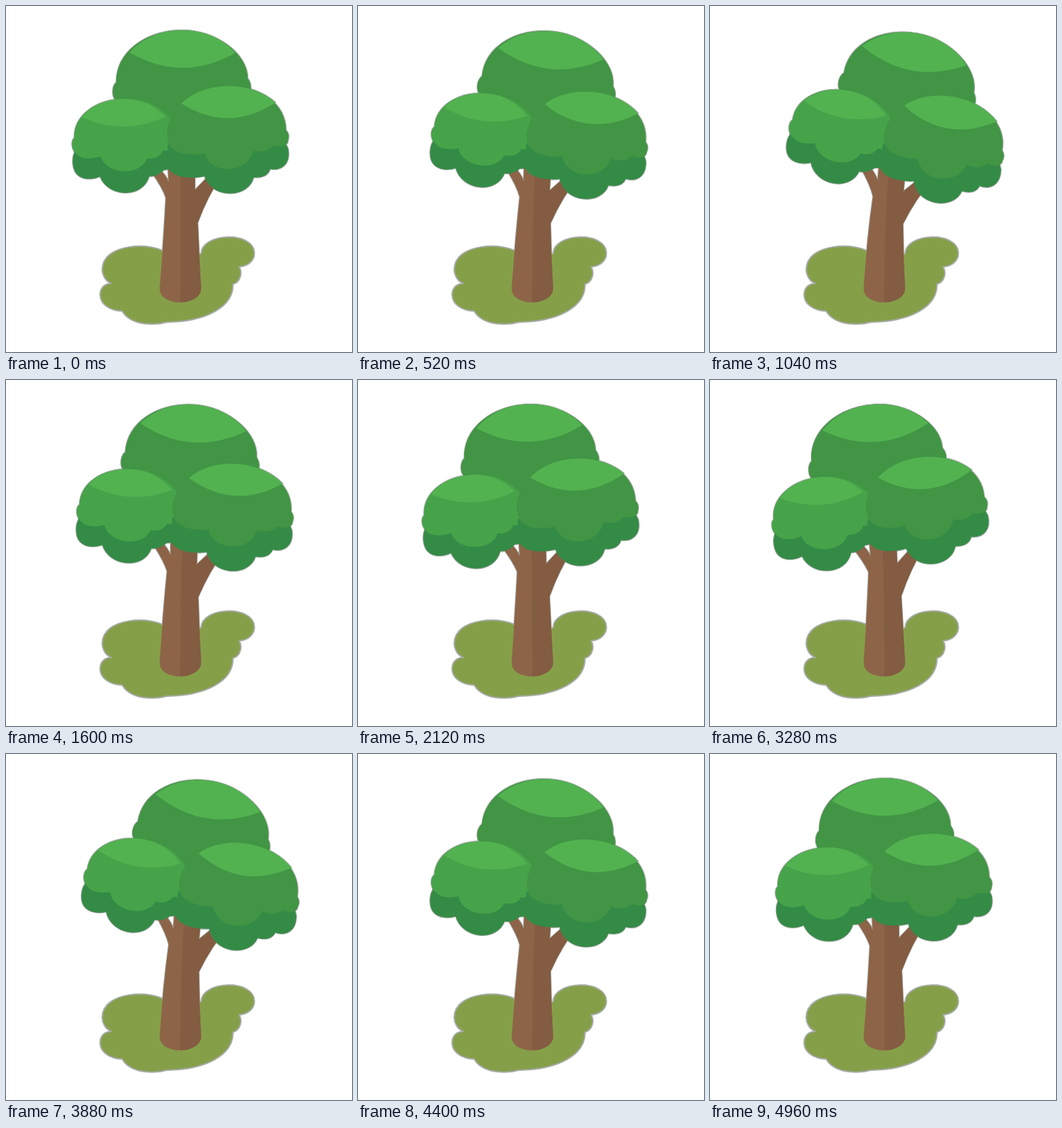
An HTML page without scripts that plays this animation: 500x500 px, repeating every 5000 ms.

```html
<!DOCTYPE html>
<html lang="en">
<head>
<meta charset="utf-8">
<title>Swaying tree</title>
<style>
  html, body { margin: 0; width: 100%; height: 100%; overflow: hidden; background: #fff; }
  svg { display: block; width: 100%; height: 100%; }
  .rim { stroke: #a6aba6; stroke-width: 2; stroke-linejoin: round; }
  .ground { fill: #859f49; }
  .bark { fill: #8d6447; }
  .bark-shade { fill: #835c42; }
  .light { fill: #52b250; }
  .mid { fill: #46a349; }
  .deep { fill: #419544; }
  .shade { fill: #348b46; }
</style>
</head>
<body>
<svg viewBox="0 0 500 500">
  <defs>
    <!-- The foot stays put and the top bends: upright, right, left -->
    <path id="trunk">
      <animate attributeName="d" dur="5s" repeatCount="indefinite" keyTimes="0;.192;.592;.792;.992;1" values="
        M222 408Q228 335 231 277Q226 262 210 240L222 236Q231 244 235 254L234 232L273 232L273 266L296 242L311 246Q292 273 277 313Q279 360 282 408C282 434 222 436 222 408Z;
        M222 408Q227 335 236 275Q233 260 220 236L232 233Q240 242 243 252L245 230L284 234L280 268L306 248L321 253Q298 278 279 315Q279 361 282 408C282 434 222 436 222 408Z;
        M222 408Q227 336 226 279Q218 265 200 246L212 239Q222 246 227 256L223 234L262 230L266 264L286 237L302 239Q286 270 275 311Q279 359 282 408C282 434 222 436 222 408Z;
        M222 408Q227 335 236 275Q233 260 220 236L232 233Q240 242 243 252L245 230L284 234L280 268L306 248L321 253Q298 278 279 315Q279 361 282 408C282 434 222 436 222 408Z;
        M222 408Q228 335 231 277Q226 262 210 240L222 236Q231 244 235 254L234 232L273 232L273 266L296 242L311 246Q292 273 277 313Q279 360 282 408C282 434 222 436 222 408Z;
        M222 408Q228 335 231 277Q226 262 210 240L222 236Q231 244 235 254L234 232L273 232L273 266L296 242L311 246Q292 273 277 313Q279 360 282 408C282 434 222 436 222 408Z"/>
    </path>
    <clipPath id="inTrunk"><use href="#trunk"/></clipPath>

    <g id="crown">
      <animateTransform attributeName="transform" type="rotate" dur="5s" repeatCount="indefinite" keyTimes="0;.192;.592;.792;.992;1"
        values="-.2 251 291;11.1 251 291;-11.5 251 291;11.1 251 291;-.7 251 291;-.2 251 291"/>
      <path class="deep" d="M158 135C153 128 154 115 160 110C160 65 204 35 255 35C303 35 350 68 350 105C354 110 356 118 353 125L340 200H190Z"/>
      <path class="light" d="M179 67C198 46 226 35 255 35C286 35 314 47 332 68Q256 111 179 67Z"/>

      <path class="shade" d="M99 212C95 220 96 236 103 243C112 252 127 250 136 246C148 277 198 278 207 246C218 247 226 240 228 237L245 235V200H99Z"/>
      <path class="mid" d="M99 190C95 193 93 206 103 214C112 223 128 220 137 217C145 244 195 246 204 220C215 222 225 216 227 209Q240 210 248 200V165L238 162C222 143 198 134 172 134C130 134 98 158 99 190Z"/>
      <path class="light" d="M110 160C126 142 148 134 172 134C196 134 217 145 231 160Q170 188 110 160Z"/>

      <path class="shade" d="M234 200V232C240 250 270 250 287 246C297 279 350 279 358 248C371 249 379 245 382 236C397 239 412 230 408 207L404 198Z"/>
      <path class="deep" d="M237 165C231 180 232 198 241 206C252 216 275 216 287 213C297 244 348 244 358 209C371 213 382 209 387 202C399 206 408 202 408 194C410 188 408 183 405 180C405 143 370 116 322 116C294 116 268 126 253 141Q241 148 237 165Z"/>
      <path class="light" d="M254 141C270 125 295 116 322 116C350 116 375 126 390 140Q322 184 254 141Z"/>
    </g>
  </defs>

  <!-- Rims lie behind all fills, so they show only against the white -->
  <use href="#crown" class="rim"/>
  <use href="#trunk" class="bark rim"/>
  <path class="ground rim" d="M139 381C139 342 212 340 234 358L282 358C282 327 359 325 359 357C359 368 350 376 337 377C342 385 339 399 328 402C329 434 291 456 232 457C215 462 180 462 168 441C148 440 136 430 136 417C136 407 143 401 152 401C143 397 139 388 139 381Z"/>
  <use href="#trunk" class="bark"/>
  <path class="bark-shade" clip-path="url(#inTrunk)">
    <animate attributeName="d" dur="5s" repeatCount="indefinite" keyTimes="0;.192;.592;.792;.992;1" values="
      M252 432Q252 330 252 225L330 225L330 432Z;
      M252 432Q251 330 260 225L330 225L330 432Z;
      M252 432Q253 330 244 225L330 225L330 432Z;
      M252 432Q251 330 260 225L330 225L330 432Z;
      M252 432Q252 330 252 225L330 225L330 432Z;
      M252 432Q252 330 252 225L330 225L330 432Z"/>
  </path>
  <use href="#crown"/>
</svg>
</body>
</html>
```
